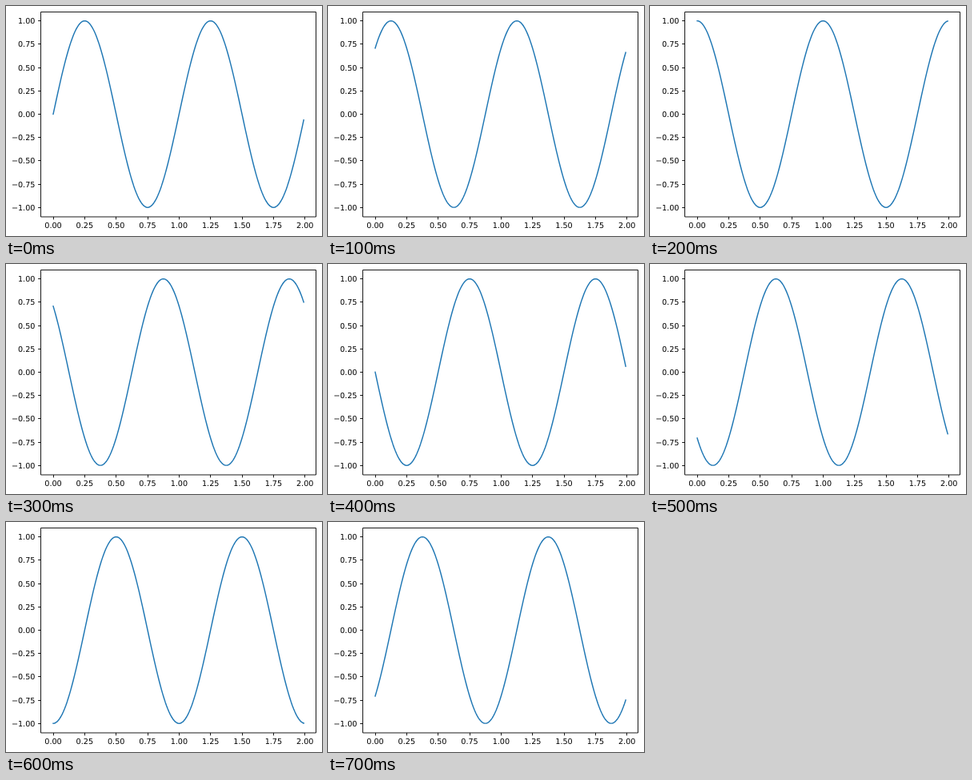
Recreate the animation shown at these times as an HTML page. Size 395 px wide and 288 px high, loop 800 ms.

```html
<!DOCTYPE html>
<html lang="en">
<head>
<meta charset="utf-8">
<title>Travelling sine wave</title>
<style>
  html, body { margin: 0; width: 100%; height: 100%; overflow: hidden; background: #fff; }
  svg { display: block; width: 395px; height: 288px; }
  text { font: 9.64px "DejaVu Sans", sans-serif; fill: #000; text-rendering: geometricPrecision; }
  .axis { fill: none; stroke: #000; stroke-width: .9; }
  .wave { fill: none; stroke: #1f77b4; stroke-width: 1.45; stroke-linecap: square; stroke-linejoin: round; }
</style>
</head>
<body>
<svg viewBox="0 0 395 288">
  <g id="ticks"></g>
  <path id="wave" class="wave"/>
  <path class="axis" d="M43.5 7.5H387.5V264H43.5Z"/>
</svg>
<script>
  const STEP_MS = 100, STEPS = 8;
  const px = x => 59 + x * 157.35;
  const py = y => 135.4 - y * 116.8;
  const snap = v => Math.floor(v) + .5;

  const ticks = document.getElementById('ticks');
  const wave = document.getElementById('wave');

  function add(tag, attrs, label = '') {
    const el = document.createElementNS('http://www.w3.org/2000/svg', tag);
    for (const name in attrs) el.setAttribute(name, attrs[name]);
    el.textContent = label;
    ticks.append(el);
  }

  for (let i = 0; i <= 8; i++) {
    const x = i / 4, y = i / 4 - 1;
    add('path', { class: 'axis', d: `M${snap(px(x))} 264v3.4` });
    add('text', { x: px(x), y: 278.3, 'text-anchor': 'middle' }, x.toFixed(2));
    add('path', { class: 'axis', d: `M43.5 ${snap(py(y))}h-3.4` });
    add('text', { x: 36.4, y: py(y) + 3.6, 'text-anchor': 'end' },
        y.toFixed(2).replace('-', '\u2212'));
  }

  // 200 samples over [0, 1.99], shifted by a phase
  function curve(phase) {
    const pts = [];
    for (let i = 0; i < 200; i++) {
      const x = i / 100;
      pts.push(px(x).toFixed(2) + ' ' + py(Math.sin(2 * Math.PI * (x + phase))).toFixed(2));
    }
    return 'M' + pts.join('L');
  }

  let shown = -1;
  function draw(now) {
    const step = Math.floor(now / STEP_MS) % STEPS;
    if (step !== shown) {
      shown = step;
      wave.setAttribute('d', curve(step / STEPS));
    }
  }

  function loop() {
    draw(performance.now());
    requestAnimationFrame(loop);
  }
  draw(0);
  requestAnimationFrame(loop);
</script>
</body>
</html>
```
